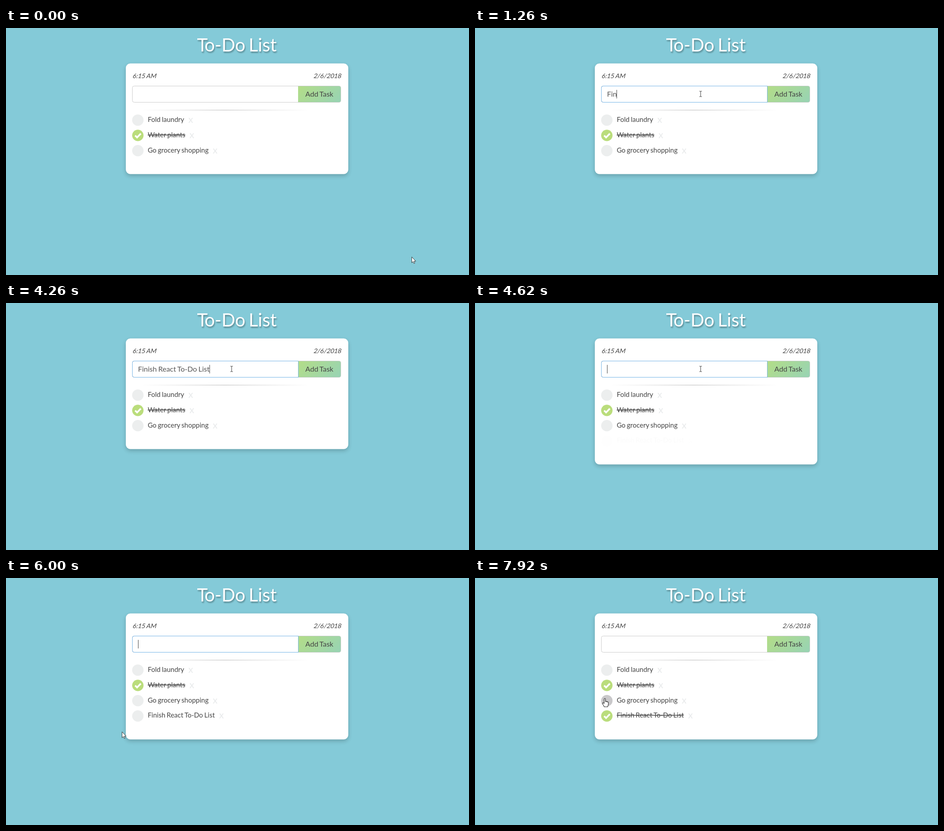
Write an HTML page that moves like this. It is 1024 by 547 pixels and loops after 8000 ms.

```html
<!DOCTYPE html>
<html lang="en">
<head>
<meta charset="utf-8">
<title>To-Do List</title>
<style>
  html, body { margin: 0; width: 100%; height: 100%; overflow: hidden; background: #84cad8; }
  svg { display: block; width: 100vw; height: 100vh; font-family: Lato, sans-serif; }
  text { white-space: pre; fill: #444; word-spacing: -.055em; }
  .title { font-size: 40px; text-anchor: middle; word-spacing: -3px; }
  .meta { font-size: 14px; }
  .entry { font-size: 16px; }
  .item { font-size: 15px; }
  .done { text-decoration: line-through; }
  .remove { font-size: 15px; font-weight: 700; fill: #e9ebec; }
</style>
</head>
<body>
<svg viewBox="0 0 1024 547">
  <defs>
    <filter id="wide" x="-20%" y="-40%" width="140%" height="180%"><feGaussianBlur stdDeviation="5"/></filter>
    <filter id="soft" x="-20%" y="-40%" width="140%" height="180%"><feGaussianBlur stdDeviation="1.8"/></filter>
    <linearGradient id="green" gradientUnits="userSpaceOnUse" x1="660" y1="114" x2="727" y2="180">
      <stop offset="0" stop-color="#b3dd87"/><stop offset="1" stop-color="#97d3b5"/>
    </linearGradient>
    <linearGradient id="rule">
      <stop offset="0" stop-color="#ccc" stop-opacity="0"/>
      <stop offset=".5" stop-color="#ccc"/>
      <stop offset="1" stop-color="#ccc" stop-opacity="0"/>
    </linearGradient>
  </defs>

  <rect width="1024" height="547" fill="#84cad8"/>
  <text class="title" x="512" y="55" style="fill:#000" opacity=".32" filter="url(#soft)">T<tspan dx="-2">o-Do List</tspan></text>
  <text class="title" x="510.5" y="52" style="fill:#fff">T<tspan dx="-2">o-Do List</tspan></text>

  <rect class="card" x="265" y="82.5" width="492" rx="10" opacity=".2" filter="url(#wide)"/>
  <rect class="card" x="265" y="78.5" width="492" rx="10" fill="#fff"/>

  <text class="meta" transform="translate(279.4 111) skewX(-14)">6:15 AM</text>
  <text class="meta" transform="translate(741 111) skewX(-14)" text-anchor="end">2/6/2018</text>

  <path d="M646.5 128.5H283.5a4 4 0 0 0-4 4V160.5a4 4 0 0 0 4 4H646.5" fill="#fff" stroke="#ccc"/>
  <path d="M646 128.5H736.5a4 4 0 0 1 4 4V160.5a4 4 0 0 1-4 4H646" fill="url(#green)" stroke="#c3cbc6"/>
  <path id="ring" d="M646.5 128.5H283.5a4 4 0 0 0-4 4V160.5a4 4 0 0 0 4 4H646.5Z" fill="none" stroke="#74b3e6"/>
  <text class="entry" x="693" y="152" text-anchor="middle">Add Task</text>
  <text id="typed" class="entry" x="292" y="152" style="fill:#555"></text>
  <rect id="caret" y="137" width="1" height="19" fill="#444"/>

  <rect x="300" y="181" width="370" height="1.5" fill="url(#rule)"/>
  <g id="list"></g>

  <g id="pointer">
    <path id="arrow" d="M.4.4V13.4L3.3 10.7 5.2 15 7.2 14.1 5.3 9.9H9.3Z" fill="#fff" stroke="#222" stroke-width=".9"/>
    <path id="beam" d="M-2.7-6H-.9L0-5.4 .9-6H2.7M0-5.4V5.4M-2.7 6H-.9L0 5.4 .9 6H2.7" fill="none" stroke="#333"/>
    <path id="hand" d="M-1.6 11V1.4a1.5 1.5 0 0 1 3 0V7c.5-1 2.2-1 2.5.4.5-.9 1.9-.7 2.1.5.6-.6 1.7-.2 1.7 1.2V13c0 2-1.4 3.2-1.4 5.4H-1.6C-1.8 16-4.4 13.6-5.4 11.4c-.7-1.3.8-2.4 2-1.4Z" fill="#fff" stroke="#222" stroke-width="1.1" stroke-linejoin="round"/>
  </g>
</svg>
<script>
const LOOP = 8000, STEP = 60;
const TASK = 'Finish React To-Do List';
const KEYS = [1020, 1140, 1260, 1380, 1500, 1620, 1800, 1920, 1980, 2100, 2280, 2460,
  2640, 2760, 2940, 3120, 3300, 3480, 3660, 3840, 4020, 4140, 4260];
const FOCUS = 780, ENTER = 4620, BLUR = 6600, CHECK = 6660;

// start, end, from, to
const MOVES = [
  [0, 540, [897, 506.5], [499, 146]],
  [5640, 6000, [499, 146], [256.3, 340.3]],
  [6060, 6360, [256.3, 340.3], [289, 312.3]],
  [7440, 7920, [289, 312.3], [287.2, 266.8]]
];

const $ = id => document.getElementById(id);
const clamp = v => Math.max(0, Math.min(1, v));
const ease = p => p * p * (3 - 2 * p);
const show = (node, on) => node.setAttribute('visibility', on ? 'visible' : 'hidden');

function add(parent, tag, attrs, label) {
  const node = document.createElementNS('http://www.w3.org/2000/svg', tag);
  for (const key in attrs) node.setAttribute(key, attrs[key]);
  if (label) node.textContent = label;
  return parent.appendChild(node);
}

const rows = ['Fold laundry', 'Water plants', 'Go grocery shopping', TASK].map((name, i) => {
  const y = 204 + i * 33.85;
  const base = Math.floor(208.4 + i * 33.85);
  const group = add($('list'), 'g', {});
  const dot = add(group, 'circle', { cx: 291.6, cy: y, r: 12.6 });
  const tick = add(group, 'path', {
    d: `M285.6 ${y + .3}l4.3 4.2 8.3-8.5`, fill: 'none', stroke: '#fff', 'stroke-width': 3.7
  });
  const label = add(group, 'text', { class: 'item', x: 313.4, y: base }, name);
  const end = 313.4 + label.getComputedTextLength();
  add(group, 'text', { class: 'remove', x: end + 9.6, y: base + 2 }, 'X');
  return { group, dot, tick, label, y };
});

const cards = document.querySelectorAll('.card');

function pointerAt(t) {
  let pos = MOVES[0][2];
  for (const [start, end, from, to] of MOVES) {
    if (t < start) break;
    const p = ease(clamp((t - start) / (end - start)));
    pos = from.map((v, i) => v + (to[i] - v) * p);
  }
  return pos;
}

function drawField(t) {
  const focused = t >= FOCUS && t < BLUR;
  show($('ring'), focused);
  const count = t < ENTER ? KEYS.filter(k => k <= t).length : 0;
  const typed = $('typed');
  typed.textContent = TASK.slice(0, count);
  const width = count ? typed.getComputedTextLength() : 0;
  $('caret').setAttribute('x', Math.floor(292 + width));
  show($('caret'), focused && (t < 5040 || (t >= 5400 && t < 6240)));
}

function drawList(t, x, y) {
  const added = t >= ENTER;
  cards.forEach(c => c.setAttribute('height', added ? 279 : 245));
  let hovering = false;
  rows.forEach((row, i) => {
    const done = i === 1 || (i === 3 && t >= CHECK);
    const over = Math.hypot(x - 291.6, y - row.y) < 12.6;
    hovering = hovering || over;
    row.dot.setAttribute('fill', done ? '#badd7c' : over ? '#c9c8ca' : '#eceeee');
    show(row.tick, done);
    row.label.setAttribute('class', done ? 'item done' : 'item');
  });
  const fade = clamp((t - ENTER + STEP) / 420);
  rows[3].group.setAttribute('opacity', added ? fade * fade : 0);
  return hovering;
}

function draw(time) {
  const t = Math.floor(time / STEP) * STEP;
  const [x, y] = pointerAt(t);
  drawField(t);
  const hand = drawList(t, x, y);
  const beam = x > 279 && x < 646 && y > 128 && y < 165;
  $('pointer').setAttribute('transform', `translate(${x} ${y})`);
  show($('hand'), hand);
  show($('beam'), beam);
  show($('arrow'), !hand && !beam);
}

const begin = performance.now();
function frame() {
  draw((performance.now() - begin) % LOOP);
  requestAnimationFrame(frame);
}
frame();
</script>
</body>
</html>
```
